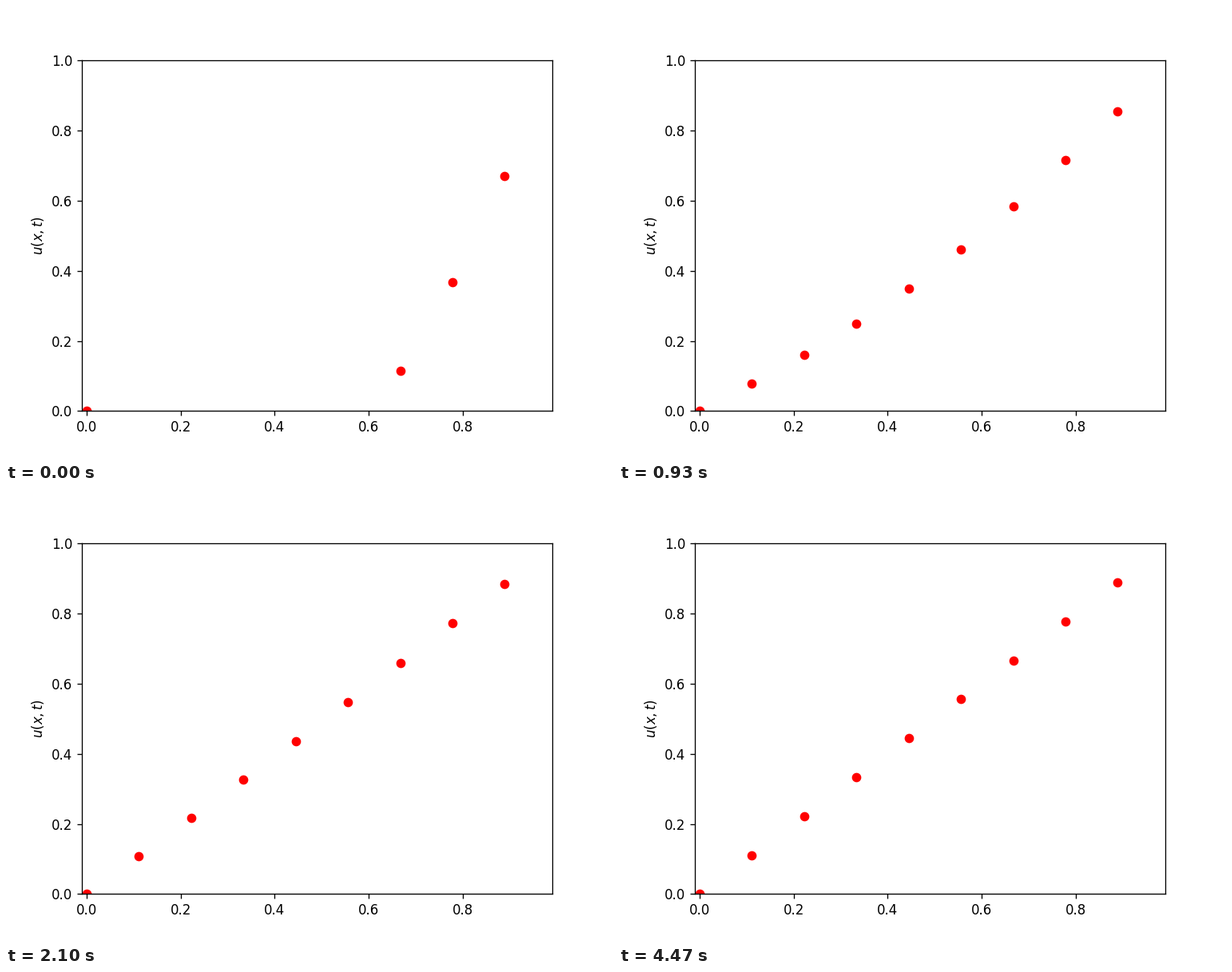
Recreate the animation shown at these times as a matplotlib script. Size 760 by 570 pixels, loop 4860 ms.

```python
import numpy as np
import matplotlib.pyplot as plt
from matplotlib.animation import FuncAnimation

DPI = 120
STEPS = 162          # time steps covering t = 0..1
INTERVAL = 30        # ms per step

x = np.arange(9) / 9


def u(x, t):
    """Heat equation: steady profile x plus one decaying sine mode."""
    return x - 2 / np.pi * np.sin(np.pi * x) * np.exp(-np.pi**2 * t)


fig, ax = plt.subplots(figsize=(760 / DPI, 570 / DPI), dpi=DPI)
ax.set_xlim(-0.01, 0.99)
ax.set_ylim(0, 1)
ax.set_ylabel("$u(x,t)$")
dots, = ax.plot(x, u(x, 0), "ro")


def update(k):
    dots.set_ydata(u(x, k / STEPS))
    return dots,


def init():
    return update(0)


anim = FuncAnimation(fig, update, frames=STEPS, init_func=init,
                     interval=INTERVAL, repeat=True, repeat_delay=0)
plt.show()
```
